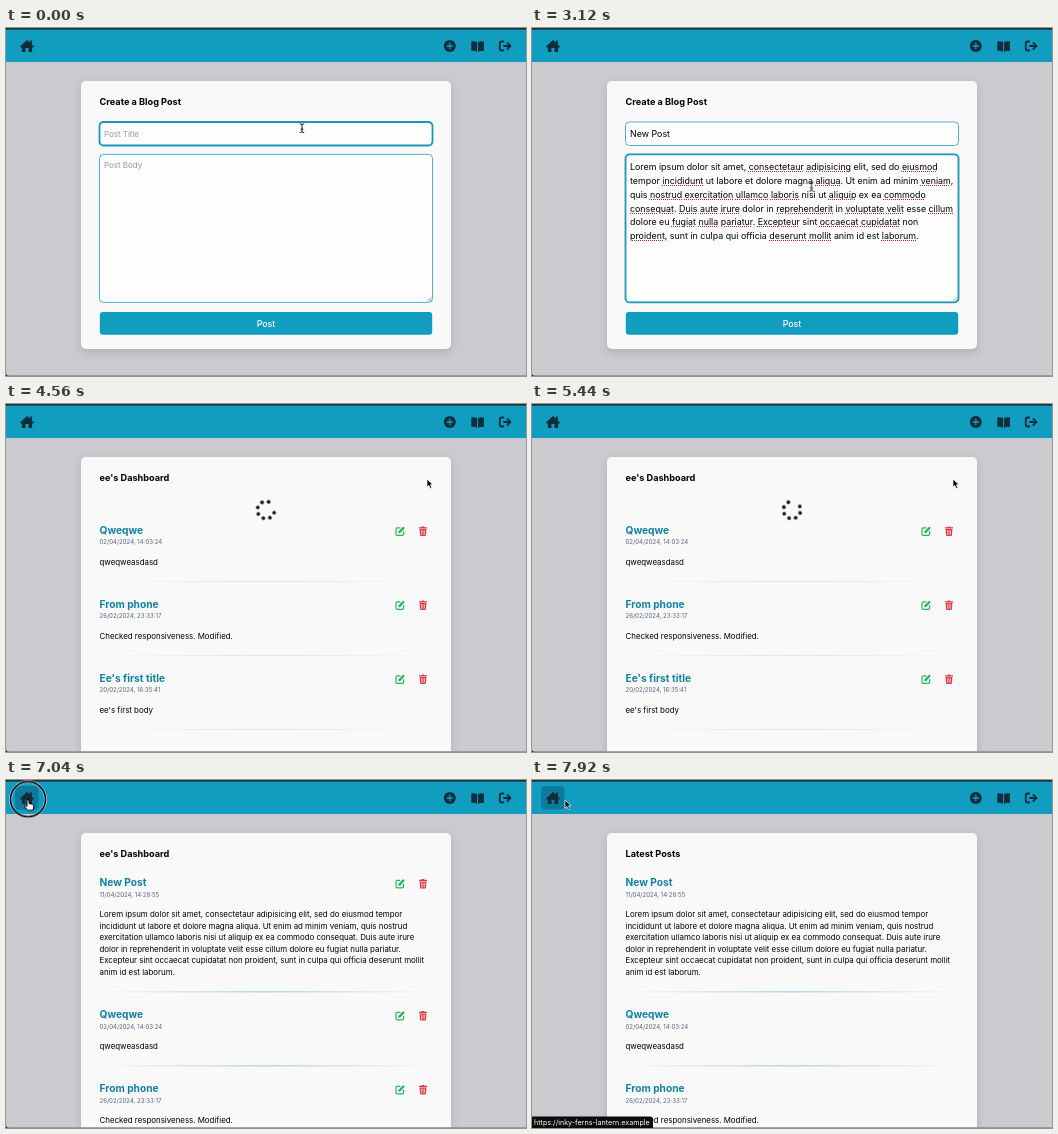
These frames come from a looping animation (520x348 px, 8000 ms). An HTML page:

```html
<!DOCTYPE html>
<html lang="en">
<head>
<meta charset="utf-8">
<title>Blog post demo</title>
<style>
  html, body { margin: 0; width: 100%; height: 100%; overflow: hidden; background: #cbcbcf; }
  svg { display: block; width: 520px; height: 348px; font-family: Inter, sans-serif; fill: #000; }

  .card { fill: #f9f9f9; filter: drop-shadow(0 3px 4px #0002); }
  .heading { font-size: 9.17px; font-weight: 700; }
  .field { fill: #fdfdfd; stroke: #22a0b6; stroke-width: .8; }
  .focus { fill: none; stroke: #1e97b6; stroke-width: 1.8; }
  .hint { font-size: 7.95px; fill: #98989c; }
  .typed { font-size: 8.87px; }
  .lorem { font: 8.87px/13.9px Inter, sans-serif; white-space: pre; color: #000; }
  .lorem u { text-decoration: underline dotted #d0202c 1px; text-underline-offset: 1px; }
  .title { font-size: 10.2px; font-weight: 700; fill: #1180a3; }
  .date { font-size: 6.05px; fill: #56647e; }
  .body { font-size: 7.9px; }
  .divider { fill: url(#fade); opacity: .85; }
  .loading .divider { opacity: .3; }
  .status { font-size: 7.15px; fill: #fff; }
  .nav { fill: #122d3a; }
  .line { fill: none; stroke-linecap: round; stroke-linejoin: round; }

  .button { fill: #109dc0; animation: hover 8s linear infinite; }
  @keyframes hover { 0%, 43% { fill: #109dc0 } 45%, 51% { fill: #0d7b9e } 53%, 100% { fill: #109dc0 } }

  .spinner {
    fill: none; stroke: #111; stroke-width: 3.7; stroke-linecap: round;
    stroke-dasharray: 0 1 0 1 0 1 0 1 0 1 0 1 0 2;
    transform-origin: 260px 106px; animation: spin 1s linear infinite;
  }
  @keyframes spin { from { transform: rotate(176deg) } to { transform: rotate(536deg) } }

  .pointer { animation: travel 8s ease-in-out infinite; }
  @keyframes travel {
    0%, 36% { transform: translate(296px, 100px) }
    44% { transform: translate(240px, 298px) }
    47%, 50% { transform: translate(238.5px, 301px) }
    54%, 82% { transform: translate(421px, 75px) }
    87%, 92% { transform: translate(22px, 19.3px) }
    98%, 100% { transform: translate(33px, 20px) }
  }
</style>
</head>
<body>
<svg id="stage" viewBox="0 0 520 348"></svg>
<script>
const LOREM = "Lorem ipsum dolor sit amet, consectetaur adipisicing elit, sed do eiusmod tempor incididunt ut labore et dolore magna aliqua. Ut enim ad minim veniam, quis nostrud exercitation ullamco laboris nisi ut aliquip ex ea commodo consequat. Duis aute irure dolor in reprehenderit in voluptate velit esse cillum dolore eu fugiat nulla pariatur. Excepteur sint occaecat cupidatat non proident, sunt in culpa qui officia deserunt mollit anim id est laborum.";
const MISSPELLED = /\b(consectetaur|adipisicing|eiusmod|incididunt|aliqua|veniam|nostrud|exercitation|ullamco|laboris|aliquip|commodo|consequat|Duis|aute|irure|reprehenderit|voluptate|velit|cillum|fugiat|nulla|pariatur|Excepteur|occaecat|cupidatat|proident|deserunt|mollit|laborum)\b/g;

const OLD_POSTS = [
  ["Qweqwe", "02/04/2024, 14:03:24", ["qweqweasdasd"]],
  ["From phone", "26/02/2024, 23:33:17", ["Checked responsiveness. Modified."]],
  ["Ee's first title", "20/02/2024, 16:35:41", ["ee's first body"]],
];
const ALL_POSTS = [
  ["New Post", "11/04/2024, 14:28:55", LOREM.replace(/ (incididunt|exercitation|dolor in|Excepteur|anim)/g, "\n$1").split("\n")],
  ...OLD_POSTS,
];

const text = (cls, x, y, content) => `<text class="${cls}" x="${x}" y="${y}">${content}</text>`;

// Percent pairs of the loop during which the content is visible.
const show = (spans, content) => `<g data-show="${spans}">${content}</g>`;

const tools = y => `
  <g class="line" stroke="#27b35c" stroke-width="1.2" transform="translate(394 ${y})">
    <path d="M0-3.4h-2.6q-1.4 0-1.4 1.4v4.6q0 1.4 1.4 1.4h4.8q1.4 0 1.4-1.4v-2.4"/>
    <path d="M-.6.8L3.4-3.3" stroke-width="2.3"/>
  </g>
  <g transform="translate(417 ${y})" fill="#db3a40">
    <path d="M-4-4h2.4l.7-.8h1.8l.7.8h2.4v1.2h-8zM-3.4-2.2h6.8l-.4 6q-.1 1-1 1h-4q-.9 0-1-1z"/>
    <path class="line" d="M-1.5-.8v4M0-.8v4M1.5-.8v4" stroke="#f9f9f9" stroke-width=".6"/>
  </g>`;

function posts(y, items, editable) {
  return items.map(([title, date, lines]) => {
    const extra = (lines.length - 1) * 11.6;
    const out = text("title", 93.5, y, title) + text("date", 93.5, y + 10.7, date)
      + lines.map((line, i) => text("body", 93.5, y + 31 + i * 11.6, line)).join("")
      + `<rect class="divider" x="94" y="${y + 47.4 + extra}" width="332" height=".9"/>`
      + (editable ? tools(y - 2.2) : "");
    y += 74 + extra;
    return out;
  }).join("");
}

const page = (heading, content) =>
  `<rect class="card" x="75" y="53" width="370" height="310" rx="5"/>${text("heading", 93.5, 77, heading)}${content}`;

const titleBox = 'x="93.5" y="94" width="333" height="23.5" rx="4"';
const bodyBox = 'x="93.5" y="126.4" width="333" height="148" rx="4"';
const typing = [["N", 8], ["e", 9], ["w", 10], [" P", 15], ["o", 16], ["s", 17], ["t", 18]]
  .map(([key, at]) => `<tspan data-show="${at} 56.9">${key}</tspan>`).join("");
const bodyHtml = LOREM.replace(/ (tempor|quis|consequat|dolore eu|proident)/g, "\n$1").replace(MISSPELLED, "<u>$1</u>");

const form = `
  <rect class="card" x="75" y="53" width="370" height="268" rx="5"/>
  ${text("heading", 93.5, 77, "Create a Blog Post")}
  <rect class="field" ${titleBox}/><rect class="field" ${bodyBox}/>
  <path class="line" d="M421.5 273l3.5-3.5M424 273l1-1" stroke="#555" stroke-width=".6"/>
  ${show("0 22", `<rect class="focus" ${titleBox}/>`)}
  ${show("22 48.9", `<rect class="focus" ${bodyBox}/>`)}
  ${show("0 8", text("hint", 98, 109, "Post Title"))}
  ${text("typed", 98, 109.2, typing)}
  ${show("0 34", text("hint", 98, 140, "Post Body"))}
  ${show("22 26 32 34", '<rect x="98" y="132" width="1" height="12"/>')}
  ${show("34 56.9", `<foreignObject x="98" y="131.8" width="340" height="90"><div class="lorem">${bodyHtml}</div></foreignObject>`)}
  <rect class="button" x="93.8" y="284" width="332.4" height="22.7" rx="3"/>
  <text x="260" y="298.7" text-anchor="middle" font-size="8.8" font-weight="500" fill="#fff">Post</text>`;

const header = `
  <rect width="520" height="34" fill="#109dc0"/>
  <rect width="520" height="1.6" fill="#1d2b33"/>
  ${show("86.5 100", '<rect x="9" y="6" width="23.5" height="23.5" rx="4" fill="#0d7b9e"/>')}
  <g class="nav">
    <path d="M14 18.6L21 12l2.8 2.6v-2h2v3.9l2.2 2.1-.8.8h-1.1V24h-3.6v-4h-3v4h-3.6v-4.6h-1.1z"/>
    <circle cx="443.8" cy="18" r="6"/>
    <path d="M465.3 13.4q3-.6 5.8.7v9.6q-2.8-1.2-5.8-.7zM477.9 13.4q-3-.6-5.8.7v9.6q2.8-1.2 5.8-.7z"/>
  </g>
  <path class="line" d="M441 18h5.6M443.8 15.2v5.6" stroke="#109dc0" stroke-width="1.3"/>
  <path class="line" d="M497.3 13.5h-1.8q-1.7 0-1.7 1.7v5.6q0 1.7 1.7 1.7h1.8M498 18h6.2M501.4 15l3 3-3 3" stroke="#122d3a" stroke-width="1.8"/>`;

const ring = '<circle r="17.5" fill="none" stroke="#fff" stroke-opacity=".7" stroke-width="2.8"/><circle r="17.5" fill="none" stroke="#000" stroke-width="1.5"/>';
const beam = '<path class="line" d="M-1.8-4.2q1.8 0 1.8 1.2 0-1.2 1.8-1.2M0-3v6.4M-1.8 4.6q1.8 0 1.8-1.2 0 1.2 1.8 1.2M-1 1.2h2" stroke="#111" stroke-width=".9"/>';
const hand = '<path d="M-.9.8q.9-1.4 1.8 0v3l3.2.8q1.4.4 1.2 1.8l-.7 3.6h-5l-2.8-3.4q-.3-1.2.9-1l1.4.9z" transform="scale(1.1)" fill="#fff" stroke="#000" stroke-width=".9" stroke-linejoin="round"/>';
const arrow = '<path d="M0 0v8.2l1.9-1.8 1.4 3.2 1.5-.7-1.4-3.1h2.6z" fill="#000" stroke="#fff" stroke-width=".7" stroke-linejoin="round"/>';

const stage = document.getElementById("stage");
stage.innerHTML = `
  <defs><linearGradient id="fade">
    <stop stop-color="#6db9cd" stop-opacity="0"/><stop offset=".5" stop-color="#6db9cd"/><stop offset="1" stop-color="#6db9cd" stop-opacity="0"/>
  </linearGradient></defs>
  <rect width="520" height="348" fill="#cbcbcf"/>
  ${header}
  ${show("0 56.9", form)}
  <g class="loading">
    ${show("56.9 75", page("ee's Dashboard", '<circle class="spinner" cx="260" cy="106" r="8.6" pathLength="8"/>' + posts(129.5, OLD_POSTS, true)))}
  </g>
  ${show("75 91", page("ee's Dashboard", posts(106, ALL_POSTS, true)))}
  ${show("91 100", page("Latest Posts", posts(106, ALL_POSTS, false)))}
  <path d="M0 347.2h520v.8H0z" fill="#8a8a8f"/>
  <path d="M0 345q0 3 3 3H0z" fill="#222"/>
  ${show("91 100", '<path d="M0 336.5h118q3 0 3 3V348H0z" fill="#0b0b0c"/>' + text("status", 2, 344.8, "https://inky-ferns-lantern.example"))}
  <g class="pointer">
    ${show("48.9 51 87 90", ring)}
    ${show("0 8 36 43", beam)}
    ${show("43 51 87 93", hand)}
    ${show("51 87 93 100", arrow)}
  </g>`;

let css = "";
stage.querySelectorAll("[data-show]").forEach((el, i) => {
  const steps = el.dataset.show.split(" ")
    .map((at, n) => `${at}%{visibility:${n % 2 ? "hidden" : "visible"}}`).join("");
  css += `@keyframes show${i}{0%{visibility:hidden}${steps}}`;
  el.style.animation = `show${i} 8s step-end infinite`;
});
document.head.appendChild(document.createElement("style")).textContent = css;
</script>
</body>
</html>
```
